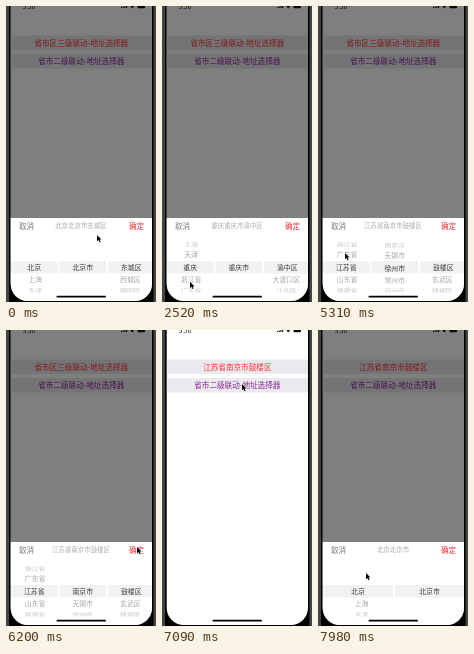
Write an HTML page with a canvas that moves like this. It is 150x296 px and loops after 8 s.

```html
<!DOCTYPE html>
<html lang="zh-CN">
<head>
<meta charset="utf-8">
<title>地址选择器</title>
<style>
html, body { margin: 0; width: 150px; height: 296px; overflow: hidden; background: #000; }
canvas { display: block; width: 150px; height: 296px; }
</style>
</head>
<body>
<canvas id="stage"></canvas>
<script>
const LOOP = 8000, STEP = 147.7, SWIPE = 600;
const CONFIRM = 6400, REOPEN = 7240;
const FONT = '"Noto Sans CJK SC", "Noto Sans CJK", "Noto Sans", sans-serif';
const W = 150, H = 296, LEFT = 4.7, RIGHT = 146, BOTTOM = 295;
const SHEET_Y = 212, SHEET_H = 82;
const ROW_Y = 261, BAND_TOP = 255, BAND_BOTTOM = 267.5, RADIUS = 32, ANGLE = 0.4;

const canvas = document.getElementById('stage');
const ctx = canvas.getContext('2d');
const dpr = window.devicePixelRatio || 1;
canvas.width = W * dpr;
canvas.height = H * dpr;

const provinces = ['北京', '上海', '天津', '重庆', '浙江省', '广东省', '江苏省', '山东省', '福建省'];
const guangdong = ['广州市', '深圳市', '珠海市', '佛山市', '江门市'];
const jiangsu = ['南京市', '无锡市', '徐州市', '常州市', '苏州市'];

const choices = [
  { from: 0, title: '北京北京市东城区', cities: ['北京市'], districts: ['东城区', '西城区', '朝阳区'] },
  { from: 1700, title: '重庆重庆市渝中区', cities: ['重庆市'], districts: ['渝中区', '大渡口区', '江北区'] },
  { from: 3150, title: '广东省广州市越秀区', cities: guangdong, districts: ['越秀区', '荔湾区', '海珠区'] },
  { from: 4350, title: '广东省珠海市香洲区', cities: guangdong, districts: ['香洲区', '斗门区', '金湾区'] },
  { from: 5250, title: '江苏省南京市鼓楼区', cities: jiangsu, districts: ['鼓楼区', '玄武区', '建邺区'] },
  { from: REOPEN, title: '北京北京市', cities: ['北京市'] }
];

// Each swipe turns a wheel by some rows and carries the cursor up to (x, y).
const swipes = [
  { at: 900, x: 28, y: 257, wheel: 'province', rows: 3 },
  { at: 2560, x: 28, y: 250, wheel: 'province', rows: 2 },
  { at: 3570, x: 78, y: 232, wheel: 'city', rows: 2 },
  { at: 4700, x: 27, y: 247, wheel: 'province', rows: 1 }
];

const moves = [
  ...swipes.flatMap(({ at, x, y }) => [
    { at: at - 320, x, y: y + 26, time: 300 },
    { at, x, y, time: SWIPE }
  ]),
  { at: 5600, x: 131, y: 217, time: 550 },
  { at: 6530, x: 80, y: 54, time: 550 },
  { at: 7450, x: 48, y: 243, time: 450 }
];

const progress = (t, at, time) => Math.min(1, Math.max(0, (t - at) / time));
const smooth = (t, at, time) => {
  const p = progress(t, at, time);
  return p * p * (3 - 2 * p);
};
const slowing = (t, at, time) => 1 - (1 - progress(t, at, time)) ** 2;

const turned = (wheel, t) => swipes
  .filter(s => s.wheel === wheel)
  .reduce((sum, s) => sum + s.rows * slowing(t, s.at, SWIPE), 0);

function cursorAt(t) {
  let x = 91, y = 229;
  for (const m of moves) {
    const p = slowing(t, m.at, m.time);
    x += (m.x - x) * p;
    y += (m.y - y) * p;
  }
  return [x, y];
}

function rect(x, y, w, h, color) {
  ctx.fillStyle = color;
  ctx.fillRect(x, y, w, h);
}

function pill(x, y, w, h, r, color) {
  ctx.fillStyle = color;
  ctx.beginPath();
  ctx.roundRect(x, y, w, h, r);
  ctx.fill();
}

function text(str, x, y, size, color) {
  ctx.font = `${size}px ${FONT}`;
  ctx.fillStyle = color;
  ctx.fillText(str, x, y);
}

function wheel(items, index, x, top, bottom, color) {
  ctx.save();
  ctx.beginPath();
  ctx.rect(0, top, W, bottom - top);
  ctx.clip();
  items.forEach((item, i) => {
    const a = (i - index) * ANGLE;
    if (Math.abs(a) > 1.25) return;
    ctx.save();
    ctx.translate(x, ROW_Y + RADIUS * Math.sin(a));
    ctx.scale(1, Math.cos(a));
    ctx.globalAlpha = Math.cos(a) ** 1.5;
    text(item, 0, 0, 6.9, color);
    ctx.restore();
  });
  ctx.restore();
}

// Rows outside the band lean towards the middle of the sheet by `lean`.
function column(items, index, x, w, lean) {
  const mid = x + w / 2;
  rect(x, BAND_TOP, w, BAND_BOTTOM - BAND_TOP, '#f1f2f4');
  wheel(items, index, mid + lean, 236, BAND_TOP, '#999');
  wheel(items, index, mid, BAND_TOP, BAND_BOTTOM, '#3a3a3a');
  wheel(items, index, mid + lean, BAND_BOTTOM, 286.5, '#999');
}

function sheet(t) {
  const { title, cities, districts } = choices.filter(c => c.from <= t).pop();
  rect(0, SHEET_Y, W, 90, '#fff');
  text('取消', 20.5, 220, 7.5, '#777');
  text(title, 75, 220, 6.45, '#aaa');
  text('确定', 130.5, 220, 7.5, '#fa3038');
  if (districts) {
    const city = turned('city', t) - 2 * smooth(t, 5280, 320);
    column(provinces, turned('province', t), 5, 46.5, 0.9);
    column(cities, city, 53.5, 46.5, 0);
    column(districts, 0, 102, 46.5, -0.9);
  } else {
    column(provinces, 0, 5, 70, 3.6);
    column(cities, 0, 77, 69, -3.6);
  }
}

function statusBar() {
  text('5:50', 23, 0.8, 6.5, '#111');
  for (let i = 0; i < 4; i++) rect(115 + i * 1.7, 1 - i * 0.5, 1.1, 1 + i * 0.5, '#111');
  ctx.beginPath();
  ctx.moveTo(123.5, -1);
  ctx.lineTo(129, -1);
  ctx.lineTo(126.2, 2.4);
  ctx.fill();
  pill(131.5, -2, 7.5, 4.2, 1, '#111');
}

function button(label, y, color) {
  rect(LEFT, y - 7.5, W, 14.5, '#e9e9ee');
  text(label, 75.3, y, 7.6, color);
}

const arrow = new Path2D('M0 0V6.2L1.5 5L2.5 7.3L3.6 6.9L2.6 4.6H4.5Z');

function cursor(x, y) {
  ctx.save();
  ctx.translate(x, y);
  ctx.lineWidth = 1;
  ctx.strokeStyle = '#fff';
  ctx.stroke(arrow);
  ctx.fillStyle = '#000';
  ctx.fill(arrow);
  ctx.restore();
}

function draw(t) {
  const open = 1 - smooth(t, CONFIRM, 230) + smooth(t, REOPEN + 50, 390);
  ctx.setTransform(dpr, 0, 0, dpr, 0, 0);
  ctx.textAlign = 'center';
  ctx.textBaseline = 'middle';
  rect(0, 0, W, H, '#444');
  rect(3, 0, W - 5.5, H, '#000');

  ctx.save();
  ctx.beginPath();
  ctx.roundRect(LEFT, -30, RIGHT - LEFT, BOTTOM + 30, 17);
  ctx.clip();
  rect(0, 0, W, H, '#fff');
  statusBar();
  button(t < CONFIRM ? '省市区三级联动-地址选择器' : '江苏省南京市鼓楼区', 37, '#ff3030');
  button('省市二级联动-地址选择器', 55.5, '#8c2594');
  if (open > 0) {
    rect(0, 0, W, H, `rgba(0,0,0,${0.5 * open})`);
    ctx.translate(0, (1 - open) * SHEET_H);
    sheet(t);
  }
  ctx.restore();

  pill(50.5, 289.8, 49.5, 1.8, 0.9, '#000');
  cursor(...cursorAt(t));
}

// The picture advances in even steps.
function frame() {
  const t = performance.now() % LOOP;
  draw(Math.floor((t + 14) / STEP) * STEP);
  requestAnimationFrame(frame);
}
frame();
</script>
</body>
</html>
```
